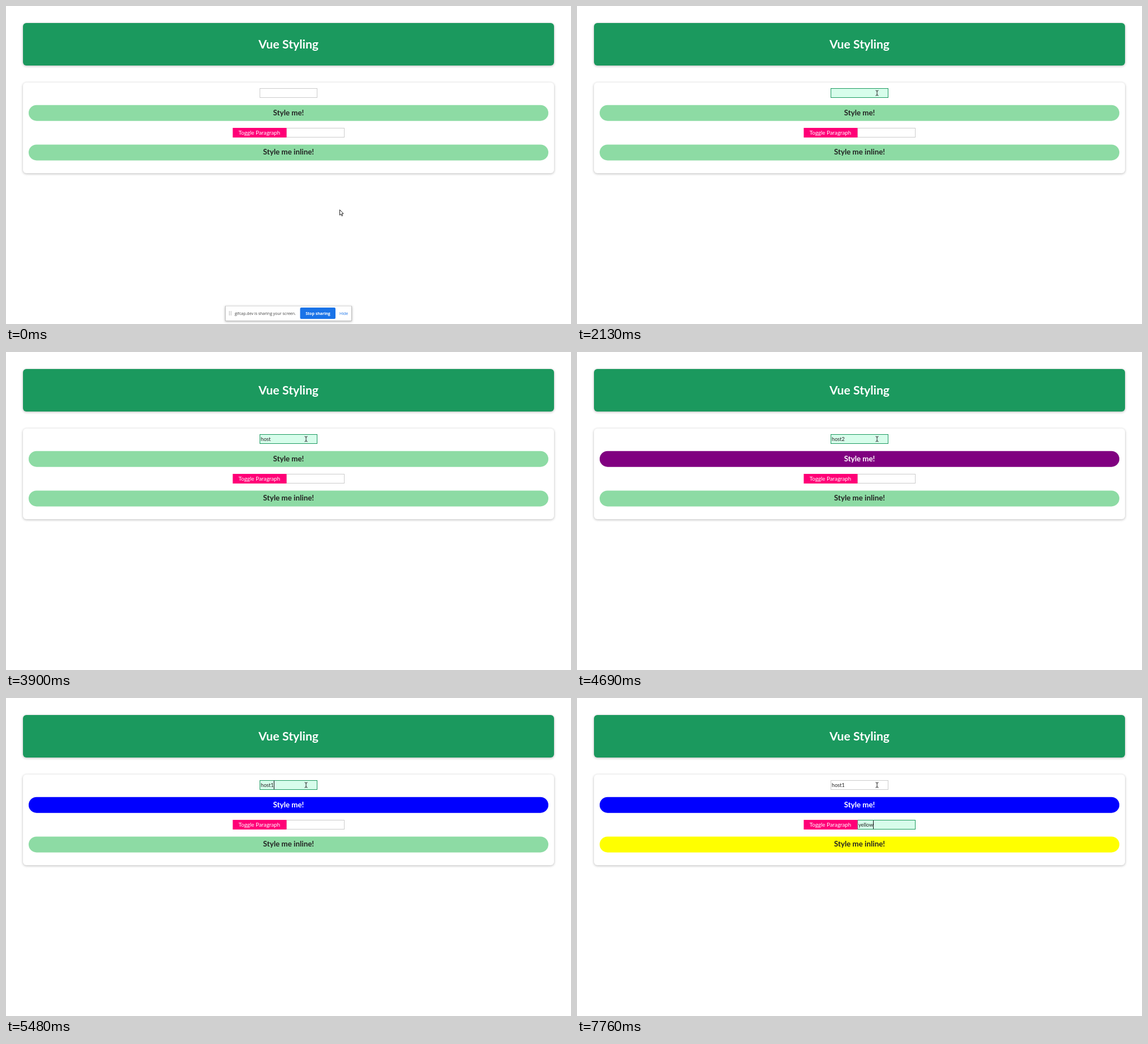
These frames come from a looping animation (998x561 px, 8 s). An HTML page with a canvas:

```html
<!DOCTYPE html>
<html lang="en">
<head>
<meta charset="utf-8">
<title>Vue Styling</title>
<style>
  html, body { margin: 0; width: 100%; height: 100%; overflow: hidden; background: #fff; }
  canvas { display: block; width: 100%; height: 100%; }
</style>
</head>
<body>
<canvas id="stage" width="998" height="561"></canvas>
<script>
const ctx = document.getElementById('stage').getContext('2d');
const LOOP = 8000;
const UI = 'Lato, sans-serif';
const SYSTEM = '"Open Sans", sans-serif';
const GREEN = '#1b995e', MINT = '#8ddba4', INK = '#222';

// Each entry changes part of the page state from its time on.
const timeline = [
  [0, { bar: true, name: '', color: '', focus: '', caret: false, fill: MINT }],
  [970, { bar: false }],
  [1640, { focus: 'name', caret: true }],
  [2130, { caret: false }],
  [2540, { name: 'h', caret: true }],
  [2630, { name: 'ho' }],
  [2830, { name: 'hos' }],
  [2920, { name: 'host' }],
  [3120, { name: 'host1' }],
  [3700, { caret: false }],
  [3900, { name: 'host' }],
  [4100, { name: 'host2', caret: true }],
  [4690, { caret: false }],
  [4790, { name: 'host', caret: true }],
  [5170, { caret: false }],
  [5480, { name: 'host1', caret: true }],
  [5980, { focus: 'button', caret: false }],
  [6770, { focus: 'color', caret: true }],
  [7360, { color: 'y' }],
  [7460, { color: 'ye' }],
  [7560, { color: 'yel' }],
  [7660, { color: 'yello' }],
  [7760, { color: 'yellow', fill: '#ff0' }]
];

const nameFill = { host1: '#00f', host2: '#800080' };

function stateAt(t) {
  return Object.assign({}, ...timeline.filter(([at]) => at <= t).map(([, patch]) => patch));
}

// The pointer moves in steps, as a screen recorder sees it.
function pointerAt(t) {
  if (t < 120) return { x: 589, y: 359 };
  if (t < 970) {
    const step = Math.min(8, Math.floor((t - 120) / 92.8) + 1);
    const p = step / 8, e = p * p * (3 - 2 * p);
    return { x: 589 + 7 * e, y: 359 + 181 * e };
  }
  if (t < 1060) return { x: 589, y: 500 };
  if (t < 1160) return { x: 541, y: 320 };
  if (t < 1360) return { x: 502, y: 190, beam: true };
  if (t < 1450) return { x: 520, y: 165 };
  return { x: 530, y: 153.5, beam: true };
}

function box(x, y, w, h, r, fill, shadow) {
  ctx.save();
  if (shadow) {
    ctx.shadowColor = 'rgba(0,0,0,.28)';
    ctx.shadowBlur = 4;
    ctx.shadowOffsetY = 1;
  }
  ctx.fillStyle = fill;
  ctx.beginPath();
  ctx.roundRect(x, y, w, h, r);
  ctx.fill();
  ctx.restore();
}

function label(str, x, y, font, color, align = 'left') {
  ctx.font = font;
  ctx.fillStyle = color;
  ctx.textAlign = align;
  ctx.fillText(str, x, y);
}

function pill(str, y, fill, color) {
  box(40, y, 918, 28, 14, fill);
  label(str, 499, y + 18, '700 13.3px ' + UI, color, 'center');
}

function field(x, y, w, str, focused, caret) {
  box(x, y, w, 17, 0, focused ? '#d7fdeb' : '#fff');
  ctx.strokeStyle = focused ? GREEN : '#ccc';
  ctx.lineWidth = 1;
  ctx.strokeRect(x + .5, y + .5, w - 1, 16);
  label(str, x + 2, y + 12, '9.2px ' + UI, INK);
  if (focused && caret) {
    const end = Math.round(x + 2 + ctx.measureText(str).width);
    box(end, y + 1, 1, 15, 0, '#111');
  }
}

function button(focused) {
  box(400.5, 215, 95, 17, 0, '#ff0077');
  label('Toggle Paragraph', 447.5, 227, '9.8px ' + UI, '#fff', 'center');
  if (!focused) return;
  ctx.strokeStyle = '#101010';
  ctx.lineWidth = 1;
  ctx.beginPath();
  ctx.roundRect(400.5, 214.5, 95, 18, 1);
  ctx.stroke();
}

function sharingBar() {
  box(387, 529, 224, 27, 1, '#bbb', true);
  box(388, 529.5, 222, 25.5, 0, '#fff');
  box(394, 538, 1, 8, 0, '#bbb');
  box(397, 538, 1, 8, 0, '#bbb');
  label('gifcap.dev is sharing your screen.', 404, 544.5, '7px ' + SYSTEM, '#444');
  box(519.5, 532, 62.5, 20, 2, '#1a73e8');
  label('Stop sharing', 551, 544.5, '700 7px ' + SYSTEM, '#fff', 'center');
  label('Hide', 589, 544.5, '7px ' + SYSTEM, '#1a73e8');
}

function pointer({ x, y, beam }) {
  ctx.save();
  ctx.translate(x, y);
  ctx.lineWidth = 1;
  ctx.strokeStyle = '#222';
  ctx.beginPath();
  if (beam) {
    ctx.moveTo(-2.5, -4.5);
    ctx.quadraticCurveTo(0, -4.5, 0, -3);
    ctx.quadraticCurveTo(0, -4.5, 2.5, -4.5);
    ctx.moveTo(0, -3.5);
    ctx.lineTo(0, 3.5);
    ctx.moveTo(-2.5, 4.5);
    ctx.quadraticCurveTo(0, 4.5, 0, 3);
    ctx.quadraticCurveTo(0, 4.5, 2.5, 4.5);
  } else {
    ctx.moveTo(.5, .5);
    for (const [px, py] of [[.5, 10], [2.7, 8], [4.2, 11.5], [5.7, 10.8], [4.3, 7.5], [7, 7.2]]) ctx.lineTo(px, py);
    ctx.closePath();
    ctx.fillStyle = '#fff';
    ctx.fill();
  }
  ctx.stroke();
  ctx.restore();
}

function draw(t) {
  const s = stateAt(t);
  const first = nameFill[s.name];
  ctx.fillStyle = '#fff';
  ctx.fillRect(0, 0, 998, 561);

  box(30, 30, 938, 75, 6, GREEN, true);
  label('Vue Styling', 499, 74.5, '700 21.2px ' + UI, '#fff', 'center');

  box(30, 135, 938, 160, 6, '#fff', true);
  field(448, 145, 102, s.name, s.focus === 'name', s.caret);
  pill('Style me!', 174.7, first || MINT, first ? '#fff' : INK);
  field(495, 215, 103, s.color, s.focus === 'color', s.caret);
  button(s.focus === 'button');
  pill('Style me inline!', 244.4, s.fill, INK);

  if (s.bar) sharingBar();
  pointer(pointerAt(t));
}

function tick() {
  draw(performance.now() % LOOP);
  requestAnimationFrame(tick);
}
tick();
</script>
</body>
</html>
```
